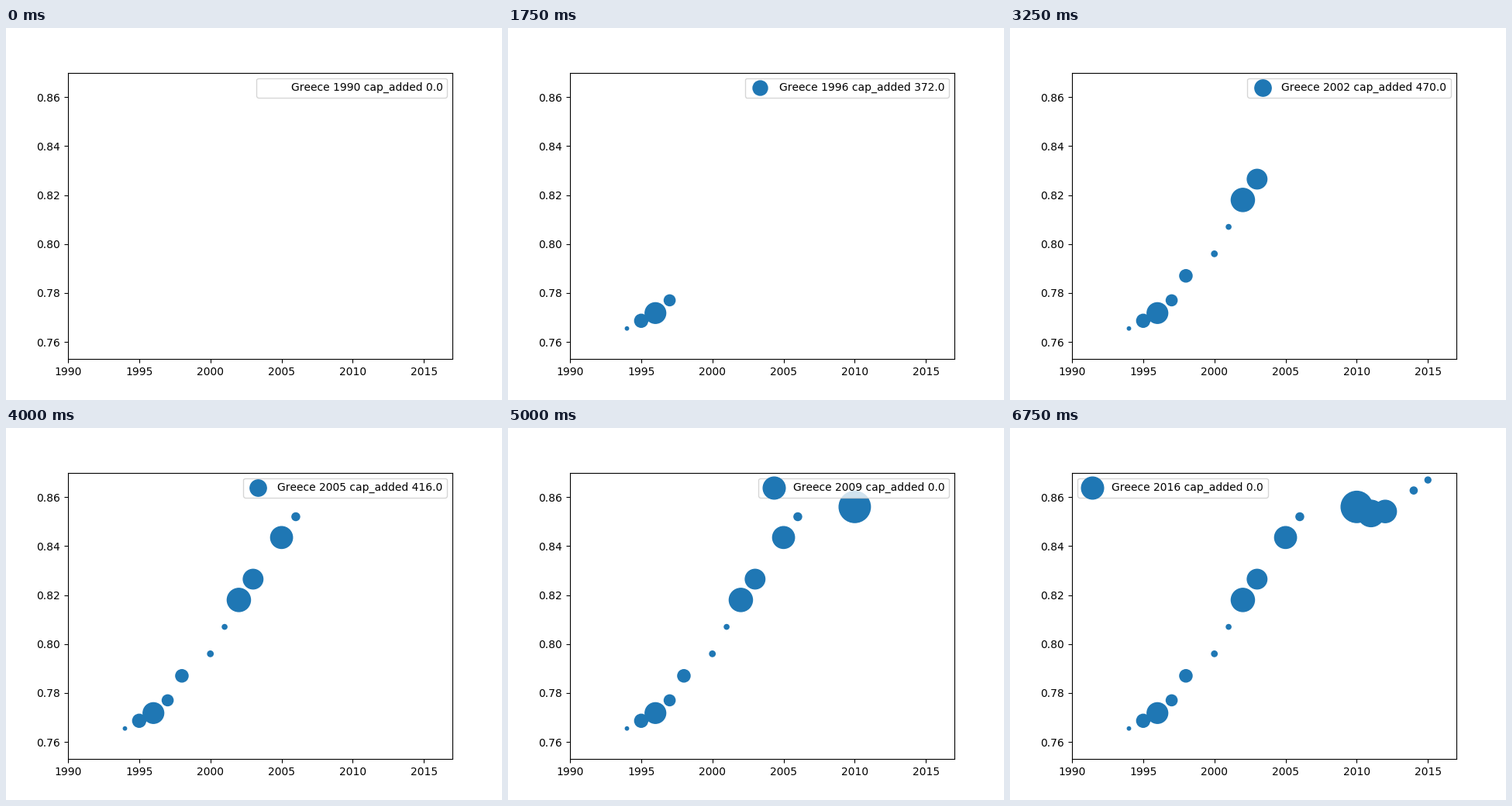
A matplotlib script for the animation above (7000 ms loop, 640 by 480 pixels).

```python
import numpy as np
import matplotlib.pyplot as plt
from matplotlib.animation import FuncAnimation

FIRST, LAST = 1990, 2017
FRAMES, INTERVAL = 28, 250
FADE = 0.717

plt.rcParams["font.family"] = "DejaVu Sans"
plt.rcParams["text.kerning_factor"] = 6


def fade(size, count):
    """Yearly additions that shrink by a constant ratio."""
    return [round(size * FADE ** k) for k in range(count)]


# Bends of the index curve, straight in between.
BENDS = [(1994, 0.7655), (1996.7, 0.774), (1998, 0.787), (2000, 0.796),
         (2002, 0.818), (2006, 0.852), (2010, 0.856), (2011.5, 0.852),
         (2015, 0.867)]

# Each building wave starts in a given year; nothing is added in between.
WAVES = {
    1994: [10, 150, 372, 105, 135],
    2000: fade(28, 2) + fade(470, 2),
    2005: [416, 53],
    2010: fade(850, 3),
    2014: fade(44, 2),
}

years = np.arange(FIRST, LAST + 1)
values = np.interp(years, *zip(*BENDS))
added = np.zeros(len(years))
for start, sizes in WAVES.items():
    added[start - FIRST:start - FIRST + len(sizes)] = sizes

fig, ax = plt.subplots(figsize=(6.4, 4.8), dpi=100)


def draw(frame):
    step = max(0, frame - 1)  # the first year is held for two frames
    shown = slice(0, step + 2)
    ax.clear()
    ax.set_xlim(FIRST, LAST)
    ax.set_ylim(0.753, 0.870)
    label = f"Greece {years[step]} cap_added {added[step]:.1f}"
    ax.scatter(years[shown], values[shown], s=added[shown],
               color="#1f77b4", label=label)
    ax.legend(loc="best")
    return []


anim = FuncAnimation(fig, draw, frames=FRAMES, init_func=lambda: draw(0),
                     interval=INTERVAL, repeat=True, repeat_delay=0)
plt.show()
```
